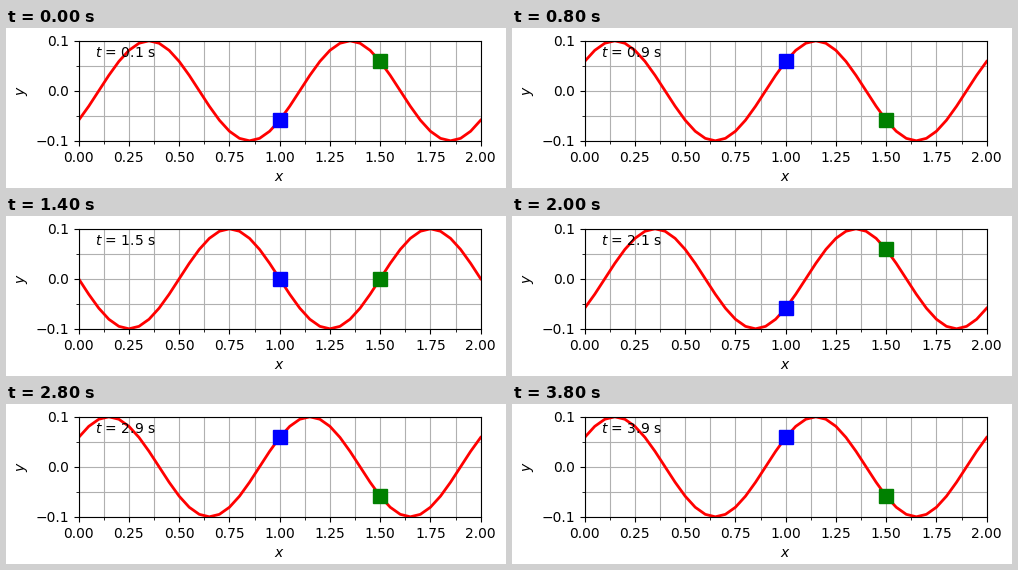
Write a matplotlib script that moves like this. It is 500x160 px and loops after 3.9 s.

```python
import numpy as np
import matplotlib.pyplot as plt
from matplotlib.animation import FuncAnimation
from matplotlib.ticker import AutoMinorLocator, MultipleLocator

W, H, DPI = 500, 160, 100
FRAMES, INTERVAL = 39, 100
AMP, WAVELENGTH, PERIOD = 0.1, 1.0, 1.0


def wave(x, t):
    return AMP * np.sin(2 * np.pi * (x / WAVELENGTH - t / PERIOD))


fig = plt.figure(figsize=(W / DPI, H / DPI), dpi=DPI)
ax = fig.add_axes([72.68 / W, 47.2 / H, 402 / W, 100 / H])
ax.set_xlim(0, 2)
ax.set_ylim(-0.1, 0.1)
ax.set_xlabel("$x$")
ax.set_ylabel("$y$")
ax.xaxis.set_major_locator(MultipleLocator(0.25))
ax.yaxis.set_major_locator(MultipleLocator(0.1))
ax.xaxis.set_minor_locator(AutoMinorLocator(2))
ax.yaxis.set_minor_locator(AutoMinorLocator(2))
ax.grid(which="both")

xs = np.linspace(0, 2, 41)
line, = ax.plot([], [], color="red", lw=2)
markers = [
    (x, ax.plot([], [], "s", color=color, ms=10)[0])
    for x, color in ((1.0, "blue"), (1.5, "green"))
]
# Label anchored in pixels from the lower left corner
label = ax.text(89.08, 131, "", transform=None)


def update(i):
    t = (i + 1) * INTERVAL / 1000
    line.set_data(xs, wave(xs, t))
    for x, marker in markers:
        marker.set_data([x], [wave(x, t)])
    label.set_text(f"$t$ = {t:.1f} s")
    return [line, label] + [marker for _, marker in markers]


anim = FuncAnimation(fig, update, frames=FRAMES, interval=INTERVAL,
                     repeat=True, repeat_delay=0)
plt.show()
```
